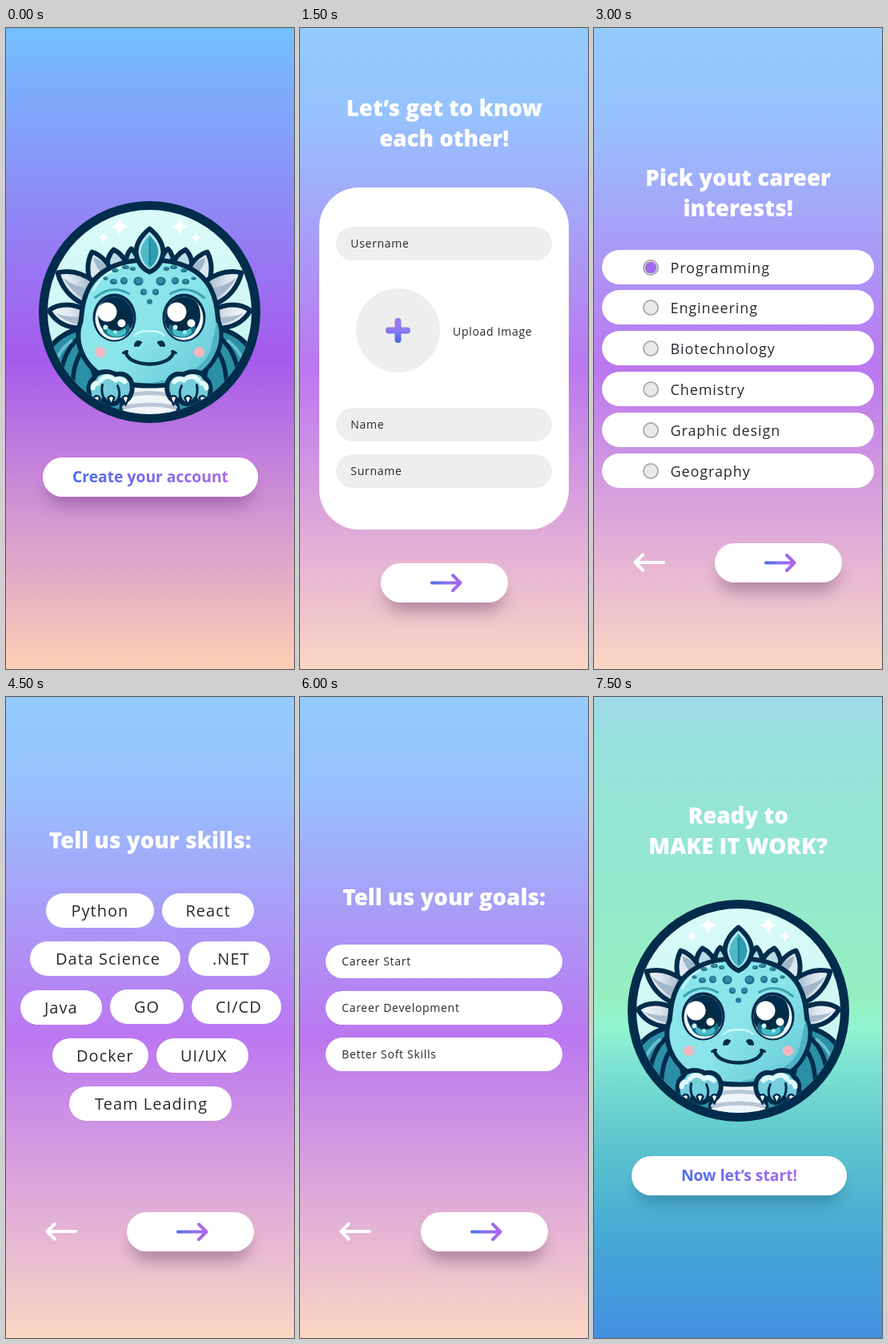
Write an HTML page with a canvas that moves like this. It is 360 px wide and 800 px high and loops after 8 s.

```html
<!DOCTYPE html>
<html lang="en">
<head>
<meta charset="utf-8">
<title>Onboarding</title>
<style>
html, body { margin: 0; width: 100%; height: 100%; overflow: hidden; }
canvas { display: block; width: 360px; height: 800px; }
</style>
</head>
<body>
<canvas id="stage"></canvas>
<script>
const canvas = document.getElementById('stage');
const ctx = canvas.getContext('2d');
const ratio = window.devicePixelRatio || 1;
canvas.width = 360 * ratio;
canvas.height = 800 * ratio;

const LOOP = 8000, STEP = 1500;
const INK = '#012c4b', TEXT = '#29262f', BLUE = '#4a6bee', PURPLE = '#ab6bea';

function gradient(x0, y0, x1, y1, ...stops) {
  const g = ctx.createLinearGradient(x0, y0, x1, y1);
  stops.forEach((s, i) => Array.isArray(s)
    ? g.addColorStop(s[0], s[1])
    : g.addColorStop(i / (stops.length - 1), s));
  return g;
}

function backdrop(...stops) {
  ctx.fillStyle = gradient(0, 0, 0, 800, ...stops);
  ctx.fillRect(0, 0, 360, 800);
}

function pill(x, y, w, h, fill = '#fff', r = h / 2) {
  ctx.fillStyle = fill;
  ctx.beginPath();
  ctx.roundRect(x, y, w, h, r);
  ctx.fill();
}

function button(x, y, w, shadow) {
  ctx.save();
  ctx.shadowColor = shadow;
  ctx.shadowBlur = 20 * ratio;
  ctx.shadowOffsetY = 15 * ratio;
  pill(x + 6, y + 4, w - 12, 41);
  ctx.restore();
  pill(x, y, w, 49);
}

function text(str, x, y, size, { weight = 400, fill = TEXT, align = 'left', spacing = 0 } = {}) {
  ctx.font = `${weight} ${size}px "Open Sans", sans-serif`;
  ctx.letterSpacing = spacing + 'px';
  ctx.textAlign = align;
  ctx.fillStyle = fill;
  ctx.fillText(str, x, y);
}

const label = (str, x, y, size) => text(str, x, y, size, { spacing: size * 0.05 });

function heading(y, lines) {
  lines.forEach((line, i) =>
    text(line, 180.2, y + i * 38, 27.7, { weight: 800, fill: '#fff', align: 'center' }));
}

function stroke(path, color, width) {
  ctx.strokeStyle = color;
  ctx.lineWidth = width;
  ctx.lineCap = ctx.lineJoin = 'round';
  ctx.stroke(new Path2D(path));
}

function shape(path, fill, width = 0, color = INK) {
  ctx.fillStyle = fill;
  ctx.fill(new Path2D(path));
  if (width) stroke(path, color, width);
}

function oval(x, y, rx, ry, fill, turn = 0) {
  ctx.fillStyle = fill;
  ctx.beginPath();
  ctx.ellipse(x, y, rx, ry, turn, 0, Math.PI * 2);
  ctx.fill();
}

function arrow(x, y, dir, color) {
  ctx.save();
  ctx.translate(x, y);
  ctx.scale(dir, 1);
  stroke('M-17.5 0H17.5M8.5 -9.5L18 0L8.5 9.5', color, 4);
  ctx.restore();
}

function nextButton(x, y) {
  button(x, y, 159, 'rgba(95,50,90,.42)');
  arrow(x + 81.5, y + 24.5, 1, gradient(-19, 0, 19, 0, '#4a70ec', '#8d72ee', '#ad64ea'));
}

function navigation() {
  arrow(69.5, 667, -1, '#fff');
  nextButton(151, 643);
}

function sparkle(x, y, r) {
  const k = r * 0.16;
  shape(`M${x} ${y - r}Q${x + k} ${y - k} ${x + r} ${y}Q${x + k} ${y + k} ${x} ${y + r}` +
    `Q${x - k} ${y + k} ${x - r} ${y}Q${x - k} ${y - k} ${x} ${y - r}Z`, '#fff');
}

function mirrored(draw) {
  for (const side of [-1, 1]) {
    ctx.save();
    ctx.scale(side, 1);
    draw();
    ctx.restore();
  }
}

function spikes() {
  const bone = gradient(125, 0, 70, 0, '#f4f8fc', '#dce6ef', '#9db5c8');
  shape('M84 20Q114 26 128 50L118 90Q98 122 58 122Z', '#2b8fa6', 6);
  stroke('M88 32Q110 50 112 88M84 48Q98 66 96 104', INK, 5.5);
  stroke('M98 36Q116 50 119 70', '#67bfce', 4);
  shape('M23 -79Q31 -71 29 -57L12 -57Q15 -73 23 -79Z', '#a9dce5', 6);
  shape('M45 -78Q55 -68 53 -50L27 -57Q33 -72 45 -78Z', '#b9dce6', 6);
  shape('M72 -75Q81 -58 74 -37L47 -50Q56 -70 72 -75Z', '#dce7f0', 6);
  shape('M70 -68Q68 -54 57 -47L50 -50Q58 -65 70 -68Z', '#9eb7ca');
  shape('M115 -49Q92 -55 69 -38L80 -9Q107 -20 115 -49Z', bone, 6);
  shape('M109 -43Q98 -26 82 -16L75 -29Q95 -32 109 -43Z', '#a2b7ca');
  shape('M126 -2Q108 -15 82 -4L86 20Q113 20 126 -2Z', bone, 6);
  shape('M118 1Q106 13 88 15L86 6Q106 7 118 1Z', '#a7bbcd');
}

function eye(x, side) {
  oval(x, 7, 27, 30, INK);
  ctx.save();
  ctx.beginPath();
  ctx.ellipse(x, 8, 24, 27, 0, 0, Math.PI * 2);
  ctx.clip();
  ctx.fillStyle = '#eefcff';
  ctx.fillRect(x - 30, -30, 60, 70);
  oval(x - side * 2.5, 4, 23, 27, INK);
  oval(x - side * 2.5, 21, 17, 11, '#176c86');
  oval(x - side * 2.5, 24, 12, 7, '#45bdc9');
  oval(x - side * 2.5, 9, 15, 15, '#052b42');
  ctx.restore();
  oval(x - 9, 0, 12, 12, '#fff');
  oval(x + 9, 14, 5, 5, '#fff');
  oval(x - 11, 19, 3, 3, '#c8f5f6');
  oval(x + 1, 25, 2.5, 2.5, '#9deaed');
}

function face() {
  const skin = gradient(-60, -40, 60, 80, '#8be6ec', '#8be4ea', '#6accd9');
  shape('M0 -65C30 -66 62 -56 76 -30C84 -14 84 -4 86 12C91 24 90 40 84 52' +
    'C70 84 34 92 0 92C-34 92 -70 84 -84 52C-90 40 -91 24 -86 12' +
    'C-84 -4 -84 -14 -76 -30C-62 -56 -30 -66 0 -65Z', skin, 6);
  shape('M84 12C89 24 88 40 81 53C68 82 34 90 0 89C34 83 65 75 76 48Z', '#4cb2c4');
  stroke('M-70 -28Q-55 -54 -26 -58', '#c4f5f3', 3);

  mirrored(() => {
    // x, y, rx, ry of each scale spot
    [[14, -38.5, 6, 5.5], [32, -39, 4.5, 4.5], [45, -38, 4.5, 3.5], [7.5, -25, 4, 4],
      [21, -54, 3.5, 2.5], [30, -56, 4.5, 2.5], [43, -52, 4, 2.5], [55, -42, 3, 2]]
      .forEach(([x, y, rx, ry]) => {
        oval(x, y, rx, ry, '#1c6884');
        oval(x - 0.5, y - 0.7, rx * 0.72, ry * 0.7, '#2d8da5');
      });
    stroke('M26 -23Q48 -35 68 -18', '#3ba2b5', 3);
    oval(62, 50, 7, 6.5, '#f3b7bf');
    stroke('M11 38Q17 35 18 42', INK, 3);
    oval(14.5, 40, 3.5, 3, INK, 0.5);
  });
  oval(0, -13, 3.5, 3.2, '#247e99');
  eye(-44, -1);
  eye(43, 1);
  stroke('M-18 29Q-12 23 -1 24Q12 23 18 29', '#ccf7f5', 2.5);
  stroke('M-30 50Q-26 64 0 65Q26 64 30 50', INK, 4.5);
  stroke('M-33 51L-28 49M33 51L28 49', INK, 3);
}

function crest() {
  shape('M0 -104Q17 -90 17 -74Q14 -56 0 -50Q-14 -56 -17 -74Q-17 -90 0 -104Z', '#b4e9ee', 6);
  shape('M0 -96Q11 -85 11 -74Q9 -61 0 -55Q-9 -61 -11 -74Q-11 -85 0 -96Z', '#2d9cb1');
  shape('M0 -96Q-11 -85 -11 -74Q-9 -61 0 -55Z', '#4fbac8');
  stroke('M0 -91V-59', '#187b94', 1.5);
}

function paw() {
  shape('M22 98C20 83 30 75 42 78C53 72 66 74 69 82C78 88 78 105 71 112' +
    'C64 116 59 112 57 109C53 116 41 117 38 109C30 114 24 108 22 98Z', '#74cedb', 6);
  stroke('M31 87Q37 81 43 85M47 82Q55 78 61 85M65 89Q71 89 71 95', '#e2fbfb', 6);
  stroke('M40 92Q36 101 39 108M59 91Q61 100 57 108', INK, 3);
  [30, 48, 66].forEach(x =>
    shape(`M${x - 4} 107Q${x} 102 ${x + 4} 107L${x} 116Z`, '#fff', 2.5));
}

function mascot(x, y) {
  ctx.save();
  ctx.translate(x, y);
  oval(0, 0, 138.5, 138.5, INK);
  ctx.save();
  ctx.beginPath();
  ctx.arc(0, 0, 127.5, 0, Math.PI * 2);
  ctx.clip();
  ctx.fillStyle = gradient(0, -130, 0, 130, '#d9fbf8', '#c4f4f1');
  ctx.fillRect(-140, -140, 280, 280);
  for (const s of [-1, 1]) {
    sparkle(s * 37.5, -106.5, 11);
    sparkle(s * 58, -93, 7);
  }
  mirrored(spikes);
  oval(0, 116, 82, 48, INK);
  oval(0, 116, 76, 43, '#3194aa');
  shape('M-30 88H30L38 136H-38Z', '#f0f5f9', 5);
  stroke('M-28 104Q0 98 28 104M-32 119Q0 112 32 119', '#b8c6d5', 5);
  face();
  crest();
  mirrored(paw);
  ctx.restore();
  ctx.restore();
}

function cta(str, x, y, from, to, shadow) {
  button(x, y, 269, shadow);
  text(str, x + 134.5, y + 31, 19.3,
    { weight: 700, align: 'center', fill: gradient(from, 0, to, 0, BLUE, PURPLE) });
}

const pastel = () => backdrop([0, '#93cbff'], [0.14, '#97c2fd'], [0.53, '#bb77f0'], [1, '#fcd6c4']);

function welcome() {
  backdrop([0, '#73c0ff'], [0.515, '#a65aee'], [1, '#ffcfb5']);
  mascot(179.5, 354.5);
  cta('Create your account', 46, 536, 83, 278, 'rgba(80,40,100,.36)');
}

function profile() {
  pastel();
  heading(110, ['Let’s get to know', 'each other!']);
  pill(24, 199, 312, 427, '#fff', 50);
  [['Username', 248], ['Name', 474], ['Surname', 532]].forEach(([name, y]) => {
    pill(45, y, 270, 42, '#eee');
    label(name, 63.3, y + 26, 14);
  });
  oval(122.5, 377.5, 52.5, 52.5, '#eee');
  stroke('M111 377.5H134M122.5 366V389', gradient(0, 362, 0, 393, '#a574ef', '#8c7bf0', '#4068e8'), 8);
  label('Upload Image', 191, 384, 14);
  nextButton(101, 668);
}

function interests() {
  pastel();
  heading(197, ['Pick yout career', 'interests!']);
  ['Programming', 'Engineering', 'Biotechnology', 'Chemistry', 'Graphic design', 'Geography']
    .forEach((name, i) => {
      const y = Math.round(276.6 + i * 50.8);
      pill(10, y, 340, 43);
      oval(71, y + 22, 10, 10, '#a9a9a9');
      oval(71, y + 22, 8.2, 8.2, '#e8e8e8');
      if (i === 0) oval(71, y + 22, 7.3, 7.3, '#a26bed');
      label(name, 95.5, y + 28.5, 18);
    });
  navigation();
}

function skills() {
  pastel();
  heading(189, ['Tell us your skills:']);
  // name, x, y, width, text x
  [['Python', 50, 245, 135, 81.5], ['React', 195, 245, 115, 224.5],
    ['Data Science', 30, 305, 188, 62], ['.NET', 228, 305, 102, 258],
    ['Java', 18, 366, 102, 48], ['GO', 130, 365, 92, 160], ['CI/CD', 232, 365, 112, 262],
    ['Docker', 58, 426, 120, 88], ['UI/UX', 188, 426, 115, 218],
    ['Team Leading', 79, 486, 203, 111]]
    .forEach(([name, x, y, w, tx]) => {
      pill(x, y, w, 43);
      label(name, tx, y + 29, 20);
    });
  navigation();
}

function goals() {
  pastel();
  heading(260, ['Tell us your goals:']);
  ['Career Start', 'Career Development', 'Better Soft Skills'].forEach((name, i) => {
    const y = 309 + i * 58;
    pill(32, y, 296, 42);
    label(name, 52.2, y + 26, 14);
  });
  navigation();
}

function ready() {
  backdrop([0, '#a0d9e9'], [0.07, '#96e2dc'], [0.25, '#94e7d0'], [0.47, '#95efc1'],
    [0.515, '#92f5d0'], [0.56, '#82e6d2'], [0.7, '#5cc4ce'], [0.85, '#44a8d5'], [1, '#4490e1']);
  heading(158, ['Ready to', 'MAKE IT WORK?']);
  mascot(180.5, 391.5);
  cta('Now let’s start!', 47, 573, 109, 254, 'rgba(25,75,120,.36)');
}

const scenes = [welcome, profile, interests, skills, goals, ready];
const start = performance.now();

function play() {
  const t = (performance.now() - start) % LOOP;
  ctx.setTransform(ratio, 0, 0, ratio, 0, 0);
  scenes[Math.floor(t / STEP)]();
  requestAnimationFrame(play);
}
play();
</script>
</body>
</html>
```
